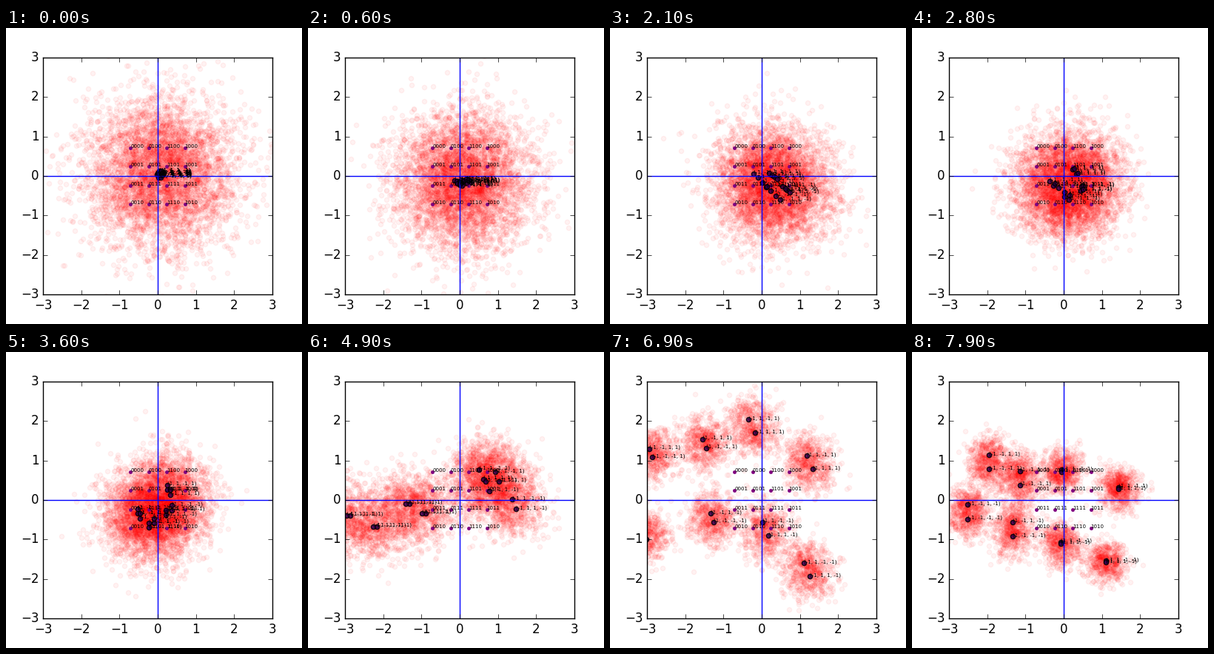
Animation, 400 px wide and 400 px high, one loop 8 s. Source, as a matplotlib script:

```python
from itertools import product

import matplotlib.pyplot as plt
import numpy as np
from matplotlib.animation import FuncAnimation

FRAMES = 80
POINTS = 5000

plt.style.use("classic")
plt.rcParams.update({"font.family": "DejaVu Sans", "font.size": 12})

words = list(product((-1, 1), repeat=4))
bits = dict(zip("abcd", np.array(words).T))


def pose(mean, **terms):
    """Centres of all words: a mean plus one vector (x + yj) per product of bits."""
    z = np.full(len(words), mean, dtype=complex)
    for name, vector in terms.items():
        z += vector * np.prod([bits[k] for k in name], axis=0)
    return z


start = pose(0.06 + 0.05j, a=0.03, b=0.02 + 0.03j, c=0.01 + 0.02j, d=0.02 - 0.03j)
early = pose(0.08 - 0.38j, a=0.07 - 0.03j, b=0.20 + 0.03j, c=0.05 - 0.05j,
             d=-0.10 + 0.08j, ab=0.03 + 0.05j)
shift = pose(0.30 - 0.22j, a=0.08 - 0.07j, b=0.17 + 0.05j, c=0.06 - 0.05j,
             d=-0.17 + 0.17j, ab=-0.04 + 0.04j)
spread = pose(-0.02 - 0.23j, a=0.06j, b=0.31 + 0.23j, c=-0.02 - 0.06j,
              d=-0.08 + 0.19j, bd=0.08 + 0.07j, cd=0.05)
split = pose(-0.47, a=0.32 + 0.13j, b=1.39 + 0.37j, c=-0.06j, d=-0.11 + 0.13j,
             ab=-0.39 - 0.03j, ad=0.28 - 0.13j, bc=0.05 - 0.06j, bd=-0.04 + 0.12j)
wide = pose(-0.81 + 0.20j, a=0.45 + 0.10j, b=1.38 - 0.12j, c=0.02 - 0.03j,
            d=-0.04 + 1.16j, ab=-0.34 - 0.07j, ad=0.28 - 0.27j,
            bc=0.06 - 0.14j, bd=-0.03 + 0.17j, abd=0.37 - 0.22j)
final = pose(-0.57 - 0.14j, a=0.29 - 0.10j, b=1.17 - 0.26j, c=0.08j,
             d=0.14 + 0.78j, ab=-0.21 + 0.11j, ad=0.29 - 0.11j,
             bc=-0.10j, bd=-0.05 + 0.14j, abd=0.38 - 0.12j)

# The last move falls back quickly, then settles
keys = [(0, start), (13, early), (21, shift), (36, spread), (49, split),
        (69, wide), (72, 0.15 * wide + 0.85 * final), (79, final)]


def centers_at(i):
    for (t0, p), (t1, q) in zip(keys, keys[1:]):
        if i <= t1:
            z = p + (q - p) * (i - t0) / (t1 - t0)
            return np.column_stack([z.real, z.imag])


def cloud_at(i, centers):
    rng = np.random.default_rng(100 + i)
    sigma = 0.95 * np.exp(-0.016 * i)
    return centers[rng.integers(0, 16, POINTS)] + rng.normal(0, sigma, (POINTS, 2))


fig = plt.figure(figsize=(4, 4), dpi=100, facecolor="white")
ax = fig.add_axes([0.125, 0.1, 0.775, 0.8])
ax.set(xlim=(-3, 3), ylim=(-3, 3), xticks=range(-3, 4), yticks=range(-3, 4))
ax.axhline(0, color="blue", lw=1)
ax.axvline(0, color="blue", lw=1)

cloud = ax.scatter([], [], s=20, color="red", alpha=0.05, linewidths=1)

# Gray-coded 16-point reference grid
gray = ["00", "01", "11", "10"]
levels = np.linspace(-1, 1, 4) * np.sqrt(0.5)
for (x, col), (y, row) in product(zip(levels, gray), zip(-levels, gray)):
    ax.scatter([x], [y], s=9, color="purple", linewidths=0.5)
    ax.text(x, y, col + row, fontsize=5)

dots = ax.scatter([], [], s=20, facecolor="#380058", edgecolor="black",
                  linewidths=1, alpha=0.85)
labels = [ax.text(0, 0, str(w), fontsize=5) for w in words]


def update(i):
    centers = centers_at(i)
    cloud.set_offsets(cloud_at(i, centers))
    dots.set_offsets(centers)
    for label, pos in zip(labels, centers):
        label.set_position(pos)
        label.set_visible(bool(np.all(np.abs(pos) <= 3)))
    return [cloud, dots, *labels]


anim = FuncAnimation(fig, update, frames=FRAMES, interval=100, repeat=True,
                     repeat_delay=0, cache_frame_data=False)
plt.show()
```
